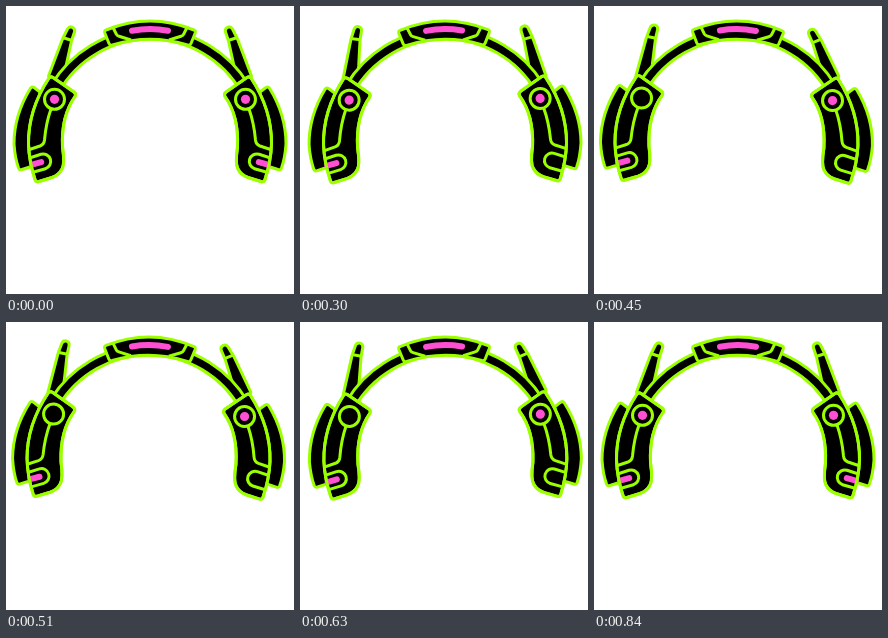
An HTML page with a canvas for the animation above (0.87 s loop, 288x288 px).

```html
<!DOCTYPE html>
<html lang="en">
<head>
<meta charset="utf-8">
<title>Headset</title>
<style>
  html, body { margin: 0; width: 100%; height: 100%; overflow: hidden; background: #fff; }
  canvas { display: block; width: 288px; height: 288px; }
</style>
</head>
<body>
<canvas id="stage"></canvas>
<script>
const SIZE = 288, LOOP = 870, REST = 180, STEP = 30;
const GREEN = '#9cff00', PINK = '#ff4fd2', BLACK = '#000';
const canvas = document.getElementById('stage');
const ctx = canvas.getContext('2d');
const ratio = window.devicePixelRatio || 1;
canvas.width = canvas.height = SIZE * ratio;

// Keys are [step, degrees]
const swingKeys = [[0, 0], [1, .5], [2, .8], [5, -.5], [7, -1], [10, .75], [11, .85],
                   [14, .3], [17, -1], [19, -.6], [23, 0]];
const leftKeys = [[0, 0], [1, -1.2], [5, -9], [10, -6.2], [14, -7.5], [19, -7.2], [23, 0]];
const rightKeys = [[0, 0], [1, 1], [5, 2], [10, -6], [14, -4.8], [19, -6], [23, 0]];

const shapes = {
  antenna: new Path2D('M45 76 L42.5 70 L56.5 33 L61.5 23 Q63.5 20 66.5 21.3 Q69.5 22.8 68.5 26 L65.5 35 L60 60 L57 72 Z'),
  antennaRing: new Path2D('M56.5 31.5 L66 34.5'),
  shell: new Path2D('M34 86 L28 81.5 Q26 80.2 24.5 82.2 Q8 109 8 138 Q9 152 12.5 162 Q13.5 164.5 16 163.5 L27 160 Z'),
  cup: new Path2D('M43 72 Q44.5 70 47 71.5 L68 86 Q70.5 88 69 90.5 Q55 110 56.5 141 ' +
    'Q59 158 56 163 Q53 169 46 171.5 L33 175.5 Q30 176.5 29 173.5 Q23 155 22.5 138 Q22 104 43 72 Z'),
  seam: new Path2D('M45 103 Q40 117 38.5 134 Q38 138.5 34 140 L23.5 143.5'),
  slot: new Path2D('M23.5 152 L35 148.3 A7.5 7.5 0 0 1 39.4 162.7 L27 166.3'),
  slotLight: new Path2D('M26 158.7 L35.2 156.1'),
  band: new Path2D('M45.9 78 A115 115 0 0 1 242.1 78 L235.2 86 A105 105 0 0 0 52.8 86 Z'),
  plate: new Path2D('M100 24 Q144 6 188 24 Q190 24.5 189.2 27 L185 37.5 Q184 40 181.5 39 ' +
    'Q144 27.5 106.5 39 Q104 40 103 37.5 L98.8 27 Q98 24.5 100 24 Z'),
  plateSeam: new Path2D('M107 21.5 L110.5 28.5 Q111 29.7 113 30.3 L125 34'),
  plateLight: new Path2D('M126 24.7 Q144 21.5 162 24.7')
};

function valueAt(keys, step) {
  const i = Math.max(1, keys.findIndex(([at]) => at >= step));
  const [a, from] = keys[i - 1], [b, to] = keys[i];
  const u = (step - a) / (b - a);
  return from + (to - from) * (1 - Math.cos(Math.PI * u)) / 2;
}

function line(shape, color = GREEN, width = 3, cap = 'butt') {
  ctx.strokeStyle = color;
  ctx.lineWidth = width;
  ctx.lineCap = cap;
  ctx.stroke(shape);
}

function solid(shape) {
  ctx.fillStyle = BLACK;
  ctx.fill(shape);
  line(shape);
}

function turn(degrees, x, y) {
  ctx.translate(x, y);
  ctx.rotate(degrees * Math.PI / 180);
  ctx.translate(-x, -y);
}

function disc(x, y, radius) {
  const shape = new Path2D();
  shape.arc(x, y, radius, 0, Math.PI * 2);
  return shape;
}

function mirrored(flip, paint) {
  ctx.save();
  if (flip) {
    ctx.translate(SIZE, 0);
    ctx.scale(-1, 1);
  }
  paint();
  ctx.restore();
}

function drawAntenna(degrees) {
  turn(degrees, 54, 70);
  solid(shapes.antenna);
  line(shapes.antennaRing);
}

function drawCup(dotOn, barOn) {
  solid(shapes.shell);
  solid(shapes.cup);
  line(shapes.seam);
  solid(disc(48.5, 93.3, 10));
  if (dotOn) {
    ctx.fillStyle = PINK;
    ctx.fill(disc(48.5, 93.3, 4.6));
  }
  if (barOn) line(shapes.slotLight, PINK, 6, 'round');
  line(shapes.slot);
  line(shapes.cup);
}

function drawPlate() {
  solid(shapes.plate);
  mirrored(false, () => line(shapes.plateSeam));
  mirrored(true, () => line(shapes.plateSeam));
  line(shapes.plateLight, PINK, 6, 'round');
}

function draw(now) {
  const time = now % LOOP;
  const step = time < REST ? 0 : Math.min(23, Math.floor((time - REST) / STEP) + 1);
  const leftDot = step < 8 || step > 20;
  const rightBar = step < 3 || step > 16;

  ctx.setTransform(ratio, 0, 0, ratio, 0, 0);
  ctx.fillStyle = '#fff';
  ctx.fillRect(0, 0, SIZE, SIZE);
  ctx.lineJoin = 'round';
  turn(valueAt(swingKeys, step), 144, 20);
  mirrored(false, () => drawAntenna(valueAt(leftKeys, step)));
  mirrored(true, () => drawAntenna(-valueAt(rightKeys, step)));
  solid(shapes.band);
  mirrored(false, () => drawCup(leftDot, true));
  mirrored(true, () => drawCup(true, rightBar));
  drawPlate();
}

const start = performance.now();
function tick() {
  draw(performance.now() - start);
  requestAnimationFrame(tick);
}
tick();
</script>
</body>
</html>
```
